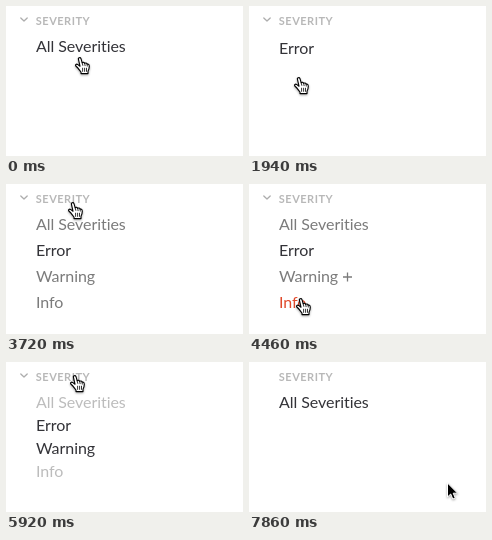
Recreate the animation shown at these times as an HTML page. Size 237 by 150 pixels, loop 8010 ms.

```html
<!DOCTYPE html>
<html lang="en">
<head>
<meta charset="utf-8">
<title>Severity filter</title>
<style>
html, body { margin: 0; width: 100%; height: 100%; overflow: hidden; background: #fff; }
svg { display: block; width: 237px; height: 150px; }
text { font-family: Lato, "Open Sans", sans-serif; font-size: 16px; letter-spacing: -.05px; }
.head { font-size: 11px; font-weight: 700; letter-spacing: .5px; fill: #b8b8b8; }
.line { fill: none; stroke-linecap: round; stroke-linejoin: round; }
.plus { stroke: currentColor; stroke-width: 1.3; }
.item text { fill: currentColor; }
#hand, #arrow { filter: drop-shadow(0 1px .8px rgba(0, 0, 0, .35)); }
</style>
</head>
<body>
<svg viewBox="0 0 237 150">
  <path id="chevron" class="line" stroke="#adadad" stroke-width="1.3" d="M14.8 12l3.2 3 3.2-3"/>
  <text class="head" x="29.8" y="19">SEVERITY</text>
  <g id="list"></g>
  <g id="hand" stroke="#000" stroke-width="1.1" stroke-linejoin="round">
    <path fill="#fff" d="M3.4 2.2C3 .5 5.4 0 6 1.6L7.2 5.8C7.8 5 9.4 5.2 9.7 6.4C10.4 5.7 11.8 6 12.1 7.2C12.9 6.7 14.1 7.2 14.2 8.4C14.5 10.5 14 12.3 13 14.2V16.6H6V15C4.6 13.4 3.4 11.2 .8 9C0 7.8 1.4 6.7 2.6 7.4L5 9.2Z"/>
    <path class="line" stroke-width=".8" d="M7.2 6l.6 2.4M9.7 6.5l.4 2.2M12.1 7.3l.2 1.8M7.6 11.2v3.2M9.6 11.2v3.2M11.5 11.2v3.2"/>
  </g>
  <path id="arrow" stroke="#fff" stroke-width="1" d="M.5 0V14L3.7 11L5.8 16L8.3 15L6.2 10.2H10.6Z"/>
</svg>
<script>
const LOOP = 8010, ROW = 26;
const items = [['All Severities', 119], ['Error', 63], ['Warning', 88], ['Info', 53]];

// Row looks: colour, opacity, distance of the plus from the label
const looks = {
  d: ['#333338'],
  g: ['#7b7b7b'],
  f: ['#7b7b7b', .5],
  h: ['#e04a2c'],
  p: ['#7b7b7b', 1, 6],
  P: ['#e04a2c', 1, 13]
};

// Time, pointer x, y, look of each row (- is hidden), flags: a arrow, s settling
const steps = [
  [0, 69, 51, 'd---'],
  [450, 69, 47, 'd---'],
  [600, 69, 42, 'd---'],
  [900, 69, 42, 'dfff'],
  [1050, 69, 42, 'dggg'],
  [1350, 57, 57, 'dggg'],
  [1500, 45, 71, 'dhgg'],
  [1940, 45, 71, '-d--', 's'],
  [2090, 45, 71, '-d--', 'a'],
  [2390, 46, 65, '-d--', 'a'],
  [2540, 49, 53, '-d--', 'a'],
  [2690, 53, 38, '-d--'],
  [2840, 57, 27, '-d--'],
  [2980, 59, 21, '-d--'],
  [3130, 62, 18, '-d--'],
  [3430, 62, 18, 'fdff'],
  [3580, 62, 18, 'gdgg'],
  [3730, 61, 36, 'Pdgg'],
  [3870, 57, 56, 'pdgg'],
  [4010, 52, 75, 'gdgg'],
  [4160, 48, 91, 'gdPg'],
  [4460, 47, 114, 'gdph'],
  [4610, 47, 114, 'gdgP'],
  [4760, 72, 100, 'gdPp'],
  [4900, 97, 89, 'gdPg'],
  [5050, 97, 89, '-dd-', 's'],
  [5190, 93, 76, '-dd-', 'a'],
  [5340, 78, 40, '-dd-'],
  [5480, 64, 12, '-dd-'],
  [5780, 64, 13, 'fddf'],
  [5930, 60, 23, 'gddg'],
  [6070, 53, 38, 'Pddg'],
  [6360, 53, 38, 'd---', 's'],
  [6510, 53, 38, 'd---'],
  [7560, 88, 57, 'd---'],
  [7710, 150, 95, 'd---', 'a'],
  [7860, 198, 121, 'd---', 'a']
];

const $ = id => document.getElementById(id);
const show = (el, on) => el.style.display = on ? '' : 'none';

$('list').innerHTML = items.map(([label]) =>
  `<g class="item"><text x="30">${label}</text><path class="plus" d="M0-5h9M4.5-9.5v9"/></g>`).join('');
const rows = [...$('list').children];

function draw([, x, y, states, flags = '']) {
  const pitch = states.includes('f') ? ROW * .88 : ROW;
  let baseline = flags.includes('s') ? 48 : 46;
  rows.forEach((row, i) => {
    const look = looks[states[i]];
    show(row, look);
    if (!look) return;
    const [color, opacity = 1, gap] = look;
    row.style.color = color;
    row.style.opacity = opacity;
    row.setAttribute('transform', `translate(0 ${baseline})`);
    const plus = row.lastChild;
    show(plus, gap);
    if (gap) plus.setAttribute('transform', `translate(${items[i][1] + gap} 0)`);
    baseline += pitch;
  });
  const away = flags.includes('a');
  show($('chevron'), !away);
  show($('hand'), !away);
  show($('arrow'), away);
  $(away ? 'arrow' : 'hand').setAttribute('transform', `translate(${x} ${y})`);
}

let start;
function tick(now) {
  start ??= now;
  const t = (now - start) % LOOP;
  draw(steps.findLast(step => step[0] <= t));
  requestAnimationFrame(tick);
}
draw(steps[0]);
requestAnimationFrame(tick);
</script>
</body>
</html>
```
